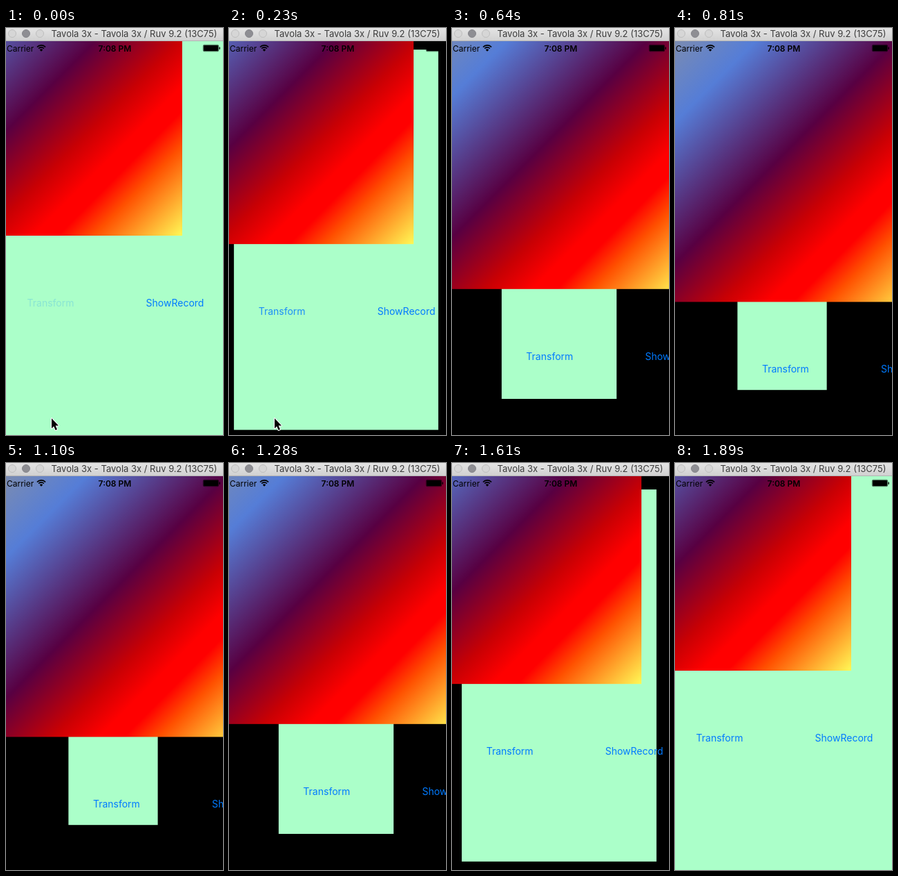
An HTML page with a canvas for the animation above (1.99 s loop, 314 px wide and 586 px high).

```html
<!DOCTYPE html>
<html lang="en">
<head>
<meta charset="utf-8">
<title>Bounds animation</title>
<style>
  html, body { margin: 0; width: 100%; height: 100%; overflow: hidden; background: #000; }
  canvas { display: block; width: 314px; height: 586px; }
</style>
</head>
<body>
<canvas id="stage" width="314" height="586"></canvas>
<script>
const ctx = document.getElementById('stage').getContext('2d');
const W = 314, H = 586, BAR = 19;
const LOOP = 1990, STEPS = 33, STEP = 1890 / STEPS;
const SHIFT = 100;
const MINT = '#abffc9', BLUE = '#007aff';

// Colour stops placed by x + y, before any shift
const STOPS = [
  [-258, '#969696'], [-55, '#557dd7'], [148, '#580042'], [270, '#c80004'],
  [338, '#ff0000'], [374, '#ff0000'], [425, '#ff5000'], [556, '#fffc58']
];

// Cubic ease-in-out with control points .42 and .58
function ease(p) {
  let lo = 0, hi = 1;
  for (let i = 0; i < 24; i++) {
    const u = (lo + hi) / 2, v = 1 - u;
    if (3 * v * v * u * 0.42 + 3 * v * u * u * 0.58 + u * u * u < p) lo = u;
    else hi = u;
  }
  return lo * lo * (3 - 2 * lo);
}

function text(str, x, y, font, color, align = 'center') {
  ctx.font = font + ' Inter, "Open Sans", sans-serif';
  ctx.textAlign = align;
  ctx.fillStyle = color;
  ctx.fillText(str, x, y);
}

function dot(x, y, r, fill, stroke) {
  ctx.beginPath();
  ctx.arc(x, y, r, 0, 7);
  ctx.fillStyle = fill;
  ctx.fill();
  ctx.strokeStyle = stroke;
  ctx.lineWidth = 1;
  ctx.stroke();
}

function drawView(d, fade) {
  ctx.fillStyle = MINT;
  ctx.fillRect(d - 5, BAR + d, 320 - 2 * d, 568 - 1.69 * d);

  const first = STOPS[0][0], last = STOPS[STOPS.length - 1][0];
  const g = ctx.createLinearGradient(first / 2 + d, first / 2 + d, last / 2 + d, last / 2 + d);
  for (const [s, color] of STOPS) g.addColorStop((s - first) / (last - first), color);
  ctx.fillStyle = g;
  ctx.fillRect(0, BAR, 255 + d, 280 + d);

  ctx.globalAlpha = fade;
  text('Transform', 64.5 + d, 401 + d, '14px', BLUE);
  ctx.globalAlpha = 1;
  text('ShowRecord', 244.5 + d, 401 + d, '14px', BLUE);
}

function drawStatus() {
  text('Carrier', 1, 34, '12px', '#000', 'left');
  text('7:08 PM', 157.5, 34, '600 12px', '#000');

  ctx.strokeStyle = '#000';
  ctx.lineWidth = 1.6;
  for (const r of [8.3, 5.3]) {
    ctx.beginPath();
    ctx.arc(51, 33.2, r, -Math.PI * 0.76, -Math.PI * 0.24);
    ctx.stroke();
  }
  ctx.fillStyle = '#000';
  ctx.beginPath();
  ctx.moveTo(51, 33.8);
  ctx.arc(51, 33.5, 3, -Math.PI * 0.76, -Math.PI * 0.24);
  ctx.fill();

  ctx.lineWidth = 0.6;
  ctx.beginPath();
  ctx.roundRect(285.3, 24.3, 22.4, 9.4, 1.8);
  ctx.stroke();
  ctx.beginPath();
  ctx.roundRect(286, 25, 21, 8, 1);
  ctx.fill();
  ctx.fillRect(308.4, 27.5, 1.4, 3.2);
}

function drawTitle() {
  const g = ctx.createLinearGradient(0, 0, 0, BAR);
  g.addColorStop(0, '#e4e4e4');
  g.addColorStop(1, '#d0d0d0');
  ctx.fillStyle = g;
  ctx.fillRect(0, 0, W, BAR);
  ctx.fillStyle = '#b4b4b4';
  ctx.fillRect(0, BAR - 1, W, 1);
  dot(9, 8, 5.5, '#d6d6d6', '#bebebe');
  dot(29, 8, 5.5, '#8e8e93', '#85858a');
  dot(49, 8, 5.5, '#d6d6d6', '#bebebe');
  text('Tavola 3x - Tavola 3x / Ruv 9.2 (13C75)', 185.5, 13, '13px', '#3c3c3c');
}

function drawPointer() {
  const p = new Path2D('M66 562V576.5L69.2 573.5L71.6 579L74 578L71.6 572.6H76Z');
  ctx.lineJoin = 'round';
  ctx.lineWidth = 2;
  ctx.strokeStyle = '#fff';
  ctx.stroke(p);
  ctx.fillStyle = '#000';
  ctx.fill(p);
}

function draw(now) {
  const k = Math.min(STEPS, Math.floor((now % LOOP) / STEP + 0.001));
  const p = 1 - Math.abs(1 - 2 * k / STEPS);
  ctx.fillStyle = '#000';
  ctx.fillRect(0, 0, W, H);
  drawView(SHIFT * ease(p), Math.min(1, 0.2 + 0.16 * k));
  drawStatus();
  drawTitle();
  if (k < 6) drawPointer();
}

const start = performance.now();
function tick() {
  draw(performance.now() - start);
  requestAnimationFrame(tick);
}
tick();
</script>
</body>
</html>
```
